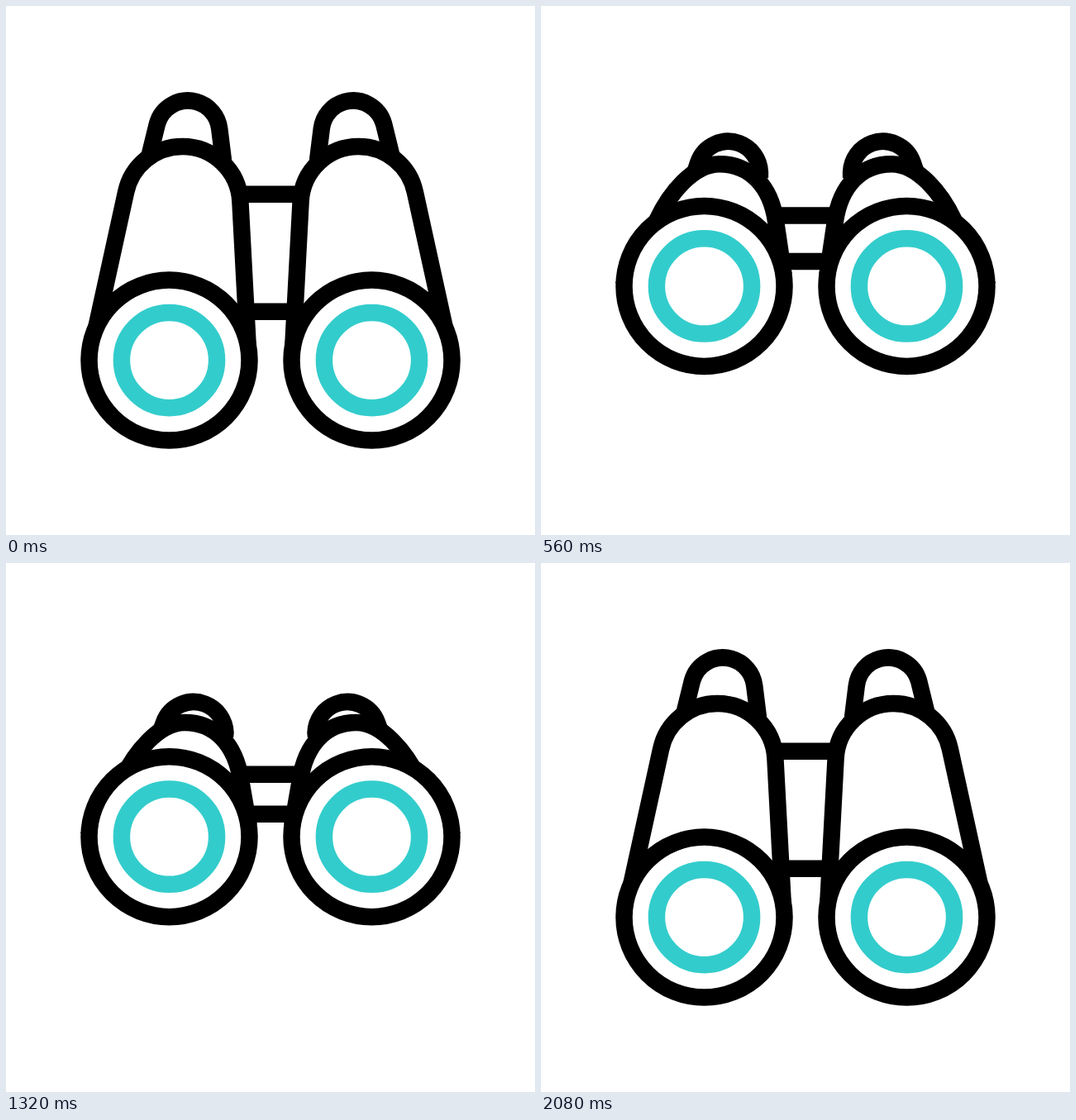
These frames come from a looping animation (640x640 px, 2.2 s). An HTML page with a canvas:

```html
<!DOCTYPE html>
<html lang="en">
<head>
<meta charset="utf-8">
<title>Binoculars</title>
<style>
html, body { margin: 0; width: 100%; height: 100%; overflow: hidden; background: #fff; }
canvas { display: block; width: 640px; height: 640px; }
</style>
</head>
<body>
<canvas id="stage" width="640" height="640"></canvas>
<script>
const ctx = document.getElementById('stage').getContext('2d');
const SIZE = 640, LOOP = 2200, STEP = 40, LINE = 20.5;
const BLACK = '#000', TEAL = '#33cccc', WHITE = '#fff';
const LENS_X = [197.5, 442.5];
const TILT_START = 205, RETURN_START = 1405, TILT_TIME = 592;
const SHINE_START = 840, SHINE_END = 1320;

const mix = (a, b, p) => a + (b - a) * p;

// Cubic bezier easing with handles (0.45, 0) and (0, 1).
function ease(x) {
  if (x <= 0) return 0;
  if (x >= 1) return 1;
  let low = 0, high = 1, s = 0.5;
  for (let i = 0; i < 30; i++) {
    s = (low + high) / 2;
    if (1.35 * s * (1 - s) ** 2 + s ** 3 < x) low = s; else high = s;
  }
  return s * s * (3 - 2 * s);
}

function tiltAt(t) {
  return ease((t - TILT_START) / TILT_TIME) - ease((t - RETURN_START) / TILT_TIME);
}

function paint(color, fill) {
  if (fill) {
    ctx.fillStyle = fill;
    ctx.fill();
  }
  ctx.strokeStyle = color;
  ctx.stroke();
}

function ring(x, y, radius, color, fill) {
  ctx.beginPath();
  ctx.arc(x, y, radius, 0, Math.PI * 2);
  paint(color, fill);
}

function bar(y) {
  ctx.beginPath();
  ctx.moveTo(285, y);
  ctx.lineTo(355, y);
  paint(BLACK);
}

function eyepiece(p) {
  ctx.beginPath();
  ctx.moveTo(mix(173, 188, p), mix(183, 201, p));
  ctx.arc(mix(220, 227, p), mix(153, 206.5, p), 38.5,
    Math.PI + mix(0.273, 0.36, p), mix(-0.125, -0.03, p));
  ctx.lineTo(mix(263, 265, p), mix(187, 210, p));
  paint(BLACK, WHITE);
}

function tube(p) {
  const at = (x0, y0, x1, y1) => [mix(x0, x1, p), mix(y0, y1, p)];
  const top = at(213.5, 170, 216, 193);
  ctx.beginPath();
  ctx.moveTo(...at(100.6, 428, 98.7, 332));
  ctx.lineTo(...at(145.1, 225.3, 140, 262));
  ctx.bezierCurveTo(...at(152, 193, 156, 229), ...at(180.5, 170, 185, 193), ...top);
  ctx.bezierCurveTo(...at(250.7, 170, 253, 193), ...at(281.5, 199.3, 277.5, 219.5),
    ...at(283.4, 236.5, 284, 262));
  ctx.lineTo(...at(292.9, 415, 293.7, 318));
  paint(BLACK, WHITE);
}

function barrel(p, lensY) {
  eyepiece(p);
  tube(p);
  ring(LENS_X[0], lensY, 97, BLACK, WHITE);
}

// Two diagonal stripes sweep through both lenses; each lies on x + y = sum.
function shine(t, lensY) {
  if (t < SHINE_START || t >= SHINE_END) return;
  const middle = 651 + (t - (SHINE_START + SHINE_END) / 2) * 1.075;
  ctx.save();
  ctx.beginPath();
  for (const x of LENS_X) {
    ctx.moveTo(x + 57.5, lensY);
    ctx.arc(x, lensY, 57.5, 0, Math.PI * 2);
  }
  ctx.clip();
  for (const sum of [middle - 35, middle + 35]) {
    ctx.beginPath();
    ctx.moveTo(sum - 200, 200);
    ctx.lineTo(sum - 460, 460);
    paint(TEAL);
  }
  ctx.restore();
}

function draw(t) {
  const p = tiltAt(t);
  const lensY = mix(428.6, 331.2, p);
  ctx.fillStyle = WHITE;
  ctx.fillRect(0, 0, SIZE, SIZE);
  ctx.lineWidth = LINE;

  bar(mix(227.7, 255.7, p));
  bar(mix(369.7, 303.7, p));
  barrel(p, lensY);
  ctx.save();
  ctx.translate(SIZE, 0);
  ctx.scale(-1, 1);
  barrel(p, lensY);
  ctx.restore();

  shine(t, lensY);
  for (const x of LENS_X) ring(x, lensY, 57.6, TEAL);
}

const start = performance.now();
function tick() {
  const t = (performance.now() - start) % LOOP;
  draw(Math.floor(t / STEP) * STEP);
  requestAnimationFrame(tick);
}
tick();
</script>
</body>
</html>
```
